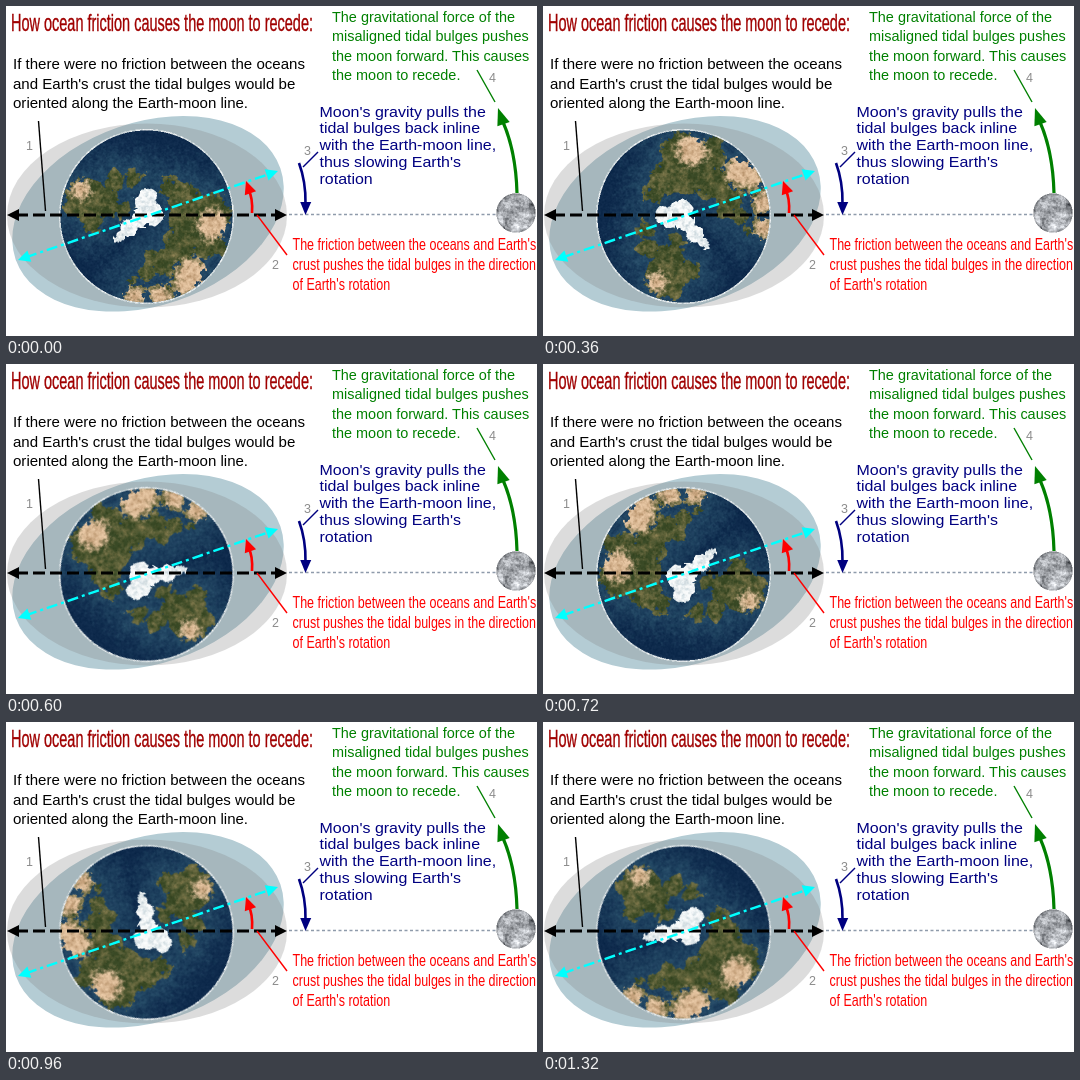
Write an HTML page with a canvas that moves like this. It is 531x330 px and loops after 1440 ms.

```html
<!DOCTYPE html>
<html lang="en">
<head>
<meta charset="utf-8">
<title>How ocean friction causes the moon to recede</title>
<style>
  html, body { margin: 0; width: 100%; height: 100%; overflow: hidden; background: #fff; }
  svg, canvas { position: absolute; left: 0; top: 0; }
  #earth { left: 52px; top: 121.5px; width: 177px; height: 177px; }
  #moon { left: 490px; top: 187px; width: 40px; height: 40px; }
  text { font-family: "Liberation Sans", Arial, sans-serif; }
  .num { font-size: 12.5px; fill: #8c8c8c; }
</style>
</head>
<body>
<svg width="531" height="330">
  <ellipse cx="142" cy="207.8" rx="140" ry="91.6" fill="#b4ccd4" transform="rotate(-18.9 142 207.8)"/>
  <ellipse cx="141" cy="209.5" rx="140" ry="92" fill="#808080" fill-opacity=".28"/>
</svg>
<canvas id="earth" width="354" height="354"></canvas>
<canvas id="moon" width="80" height="80"></canvas>
<svg id="front" width="531" height="330" fill="none"></svg>
<script>
const NS = "http://www.w3.org/2000/svg", front = document.getElementById("front");
const RED = "#f00", BLUE = "#000080", GREEN = "#008000", CYAN = "#0ff", BLACK = "#000";

function add(tag, attrs, text) {
  const el = document.createElementNS(NS, tag);
  for (const k in attrs) el.setAttribute(k, attrs[k]);
  if (text) el.textContent = text;
  front.append(el);
  return el;
}
function line(d, stroke, width = 1.4, dash = "none") {
  add("path", { d, stroke, "stroke-width": width, "stroke-dasharray": dash });
}
function head(x, y, angle, len, half, fill) {
  add("path", { d: `M0 0L${-len} ${-half}V${half}Z`, fill, transform: `translate(${x} ${y}) rotate(${angle})` });
}
function label(x, y, step, fill, size, narrow, lines) {
  return lines.map((s, i) => add("text", {
    fill, "font-size": size, transform: `translate(${x} ${y + i * step}) scale(${narrow} 1)`
  }, s));
}

line("M283 208.500H491", "#8f9bab", 1.5, "3 2.500");
line("M10 209H272", BLACK, 2.8, "12 5");
head(1, 209, 180, 12, 6, BLACK);
head(281, 209, 0, 12, 6, BLACK);
line("M20 251.300L264 167.800", CYAN, 2.4, "11 4 3 4");
head(12, 254, 161, 12, 6, CYAN);
head(272, 165, -19, 12, 6, CYAN);

line("M246 207Q247 192 242.500 184", RED, 2.6);
head(240, 175, -110, 13, 6, RED);
line("M293 157Q300 176 299.500 198", BLUE, 2.6);
head(299.500, 209, 91, 13, 5.5, BLUE);
line("M511 187Q510 146 497 116", GREEN, 3.2);
head(492, 102, -109, 17, 6.5, GREEN);

line("M32.500 115L39.500 205", BLACK);
line("M251 209L281 249", RED);
line("M297 161L312 146", BLUE);
line("M471 64L489 96", GREEN);

const [title] = label(5, 25, 0, "#a00000", 24, .604, ["How ocean friction causes the moon to recede:"]);
title.setAttribute("stroke", "#a00000");
title.setAttribute("stroke-width", .4);
label(7, 63, 19.5, BLACK, 15.05, 1, ["If there were no friction between the oceans",
  "and Earth's crust the tidal bulges would be", "oriented along the Earth-moon line."]);
label(326, 15.5, 19.5, GREEN, 14.45, 1, ["The gravitational force of the",
  "misaligned tidal bulges pushes", "the moon forward. This causes", "the moon to recede."]);
label(313.5, 110.5, 16.9, BLUE, 15, 1.065, ["Moon's gravity pulls the", "tidal bulges back inline",
  "with the Earth-moon line,", "thus slowing Earth's", "rotation"]);
label(286.5, 243.8, 20, RED, 16, .782, ["The friction between the oceans and Earth's",
  "crust pushes the tidal bulges in the direction", "of Earth's rotation"]);
[[20, 143.5], [266, 262.5], [298, 149], [483, 76]].forEach(([x, y], i) =>
  add("text", { x, y, class: "num" }, String(i + 1)));

// Seeded value noise
function hash(x, y) {
  const n = Math.sin(x * 127.1 + y * 311.7) * 43758.5453;
  return n - Math.floor(n);
}
function noise(x, y) {
  const i = Math.floor(x), j = Math.floor(y), u = x - i, v = y - j;
  const s = u * u * (3 - 2 * u), t = v * v * (3 - 2 * v);
  const a = hash(i, j), b = hash(i + 1, j), c = hash(i, j + 1), d = hash(i + 1, j + 1);
  return a + (b - a) * s + (c - a) * t + (a - b - c + d) * s * t;
}
const fbm = (x, y) => .5 * noise(x, y) + .3 * noise(x * 2.1, y * 2.1) + .2 * noise(x * 4.3, y * 4.3);
const mix = (a, b, k) => a.map((v, i) => v + (b[i] - v) * Math.max(0, Math.min(1, k)));

// Discs [x, y, radius] around the pole that merge into rough continents
const america = [[-42, -14, 17], [-58, -20, 19], [-54, 5, 11], [-33, -35, 11], [-14, -37, 9], [-68, -14, 14], [-24, -9, 8]];
const asia = [[22, -29, 10], [40, -17, 17], [44, 8, 21], [34, 29, 17], [66, -2, 20], [60, 24, 18], [74, 29, 9]];
const europe = [[17, 46, 13], [0, 56, 8], [5, 38, 6], [-15, 64, 6], [42, 55, 15]];
const africa = [[14, 80, 12], [-12, 80, 11], [38, 70, 11]];
const land = [...america, ...asia, ...europe, ...africa];
const desert = [...africa, [45, 58, 17], [66, 8, 16], [-66, -27, 10]];
const ice = [[0, -17, 11], [7, -3, 11], [-7, 3, 9], [-17, 13, 9], [-26, 20, 6]];

const depth = (discs, x, y) => Math.max(...discs.map(([a, b, r]) => r - Math.hypot(x - a, y - b)));

function paint(id, color) {
  const canvas = document.getElementById(id), n = canvas.width, half = n / 2;
  const g = canvas.getContext("2d"), img = g.createImageData(n, n);
  for (let i = 0; i < n * n; i++) {
    // Two canvas pixels to one stage pixel
    const c = color((i % n + .5 - half) / 2, (Math.floor(i / n) + .5 - half) / 2);
    if (c) img.data.set([c[0], c[1], c[2], c[3] ?? 255], 4 * i);
  }
  g.putImageData(img, 0, 0);
}

paint("earth", (x, y) => {
  const r = Math.hypot(x, y), dot = hash(Math.floor(x), Math.floor(y));
  if (r > 87.5) return null;
  // Broken white rim
  if (r > 86) return [245, 247, 248, dot > .4 ? 235 : 40];
  const n = fbm(x / 8 + 50, y / 8 + 50), m = fbm(x / 3 + 90, y / 3 + 20);
  const coast = (n - .5) * 15 + (m - .5) * 6;
  const shore = depth(land, x, y) + coast;
  let c;
  if (depth(ice, x, y) + coast * .6 > 0) {
    c = mix([178, 196, 204], [250, 252, 252], m * 1.7);
  } else if (shore > 0) {
    c = mix([56, 72, 36], [142, 130, 84], (n - .3) * 1.2 + (m - .5) * 1.1);
    const dry = (depth(desert, x, y) + 3) / 9 + (m - .5) * 1.6;
    c = mix(c, mix([168, 130, 90], [232, 200, 165], m * 1.4), dry);
  } else {
    c = mix([14, 42, 76], [44, 84, 110], m * .7 + .35 + shore / 45);
  }
  return c.map(v => v + (dot - .5) * 16);
});

paint("moon", (x, y) => {
  const r = Math.hypot(x, y);
  if (r > 19.7) return null;
  const n = fbm(x / 8 + 8, y / 8 + 3), m = fbm(x / 2, y / 2);
  const v = 166 + (n - .5) * 170 + (m - .5) * 150 + y * 1.4 - Math.max(0, r - 17.5) * 18;
  return [v - 3, v, v + 5];
});

document.getElementById("earth").animate(
  [{ transform: "rotate(0deg)" }, { transform: "rotate(-360deg)" }],
  { duration: 1440, iterations: Infinity, easing: "steps(12, end)" }
);
</script>
</body>
</html>
```
